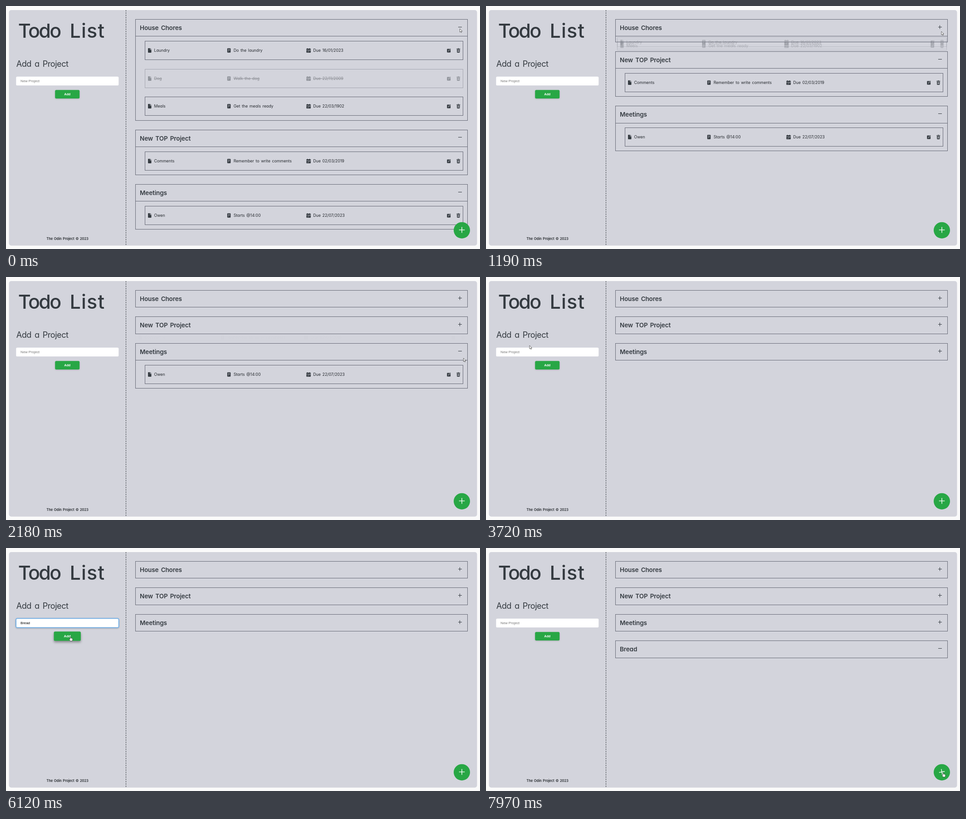
Recreate the animation shown at these times as an HTML page. Size 1045 by 536 pixels, loop 8 s.

```html
<!DOCTYPE html>
<html lang="en">
<head>
<meta charset="utf-8">
<title>Todo List</title>
<style>
  html, body { margin: 0; width: 100%; height: 100%; overflow: hidden; background: #fafafa; }
  svg { display: block; width: 1045px; height: 536px; }
  text { font-family: Inter, "Open Sans", sans-serif; font-feature-settings: "cv11"; fill: #343a40; white-space: pre; }
  .form text { font: 7.8px "Liberation Sans", Arial, sans-serif; fill: #000; }
  .form .hint { fill: #757575; }
  .form .label { font-size: 7.2px; font-weight: 700; fill: #fff; }
  .head { font-size: 13.5px; font-weight: 600; letter-spacing: -.12px; word-spacing: 2px; }
  .item text { font-size: 8.8px; word-spacing: 1.2px; fill: #25292e; }
  .line { fill: none; stroke: #676a77; stroke-width: 1; }
  .ink { fill: #343a40; }
  .cut { fill: none; stroke: #d3d4dc; stroke-width: .8; }
  .menu text { font: 5px "Noto Sans", "Open Sans", sans-serif; fill: #eee; }
  .cursor { fill: #fff; stroke: #333; stroke-width: .7; stroke-linejoin: round; }
</style>
</head>
<body>
<svg viewBox="0 0 1045 536" xmlns="http://www.w3.org/2000/svg">
  <defs>
    <g id="file" class="ink">
      <path d="M-2.7-5H.6V-2.3Q.6-1.6 1.3-1.6H3.7V3.9Q3.7 5 2.6 5H-2.6Q-3.7 5-3.7 3.9V-4Q-3.7-5-2.7-5Z"/>
      <path d="M1.3-5L3.7-2.4H1.3Z"/>
    </g>
    <g id="note">
      <rect class="ink" x="-3.7" y="-4.8" width="7.4" height="9.6" rx="1.2"/>
      <path class="cut" d="M-1.7-2.4H1.8M-1.7-.4H1.8M-1.7 1.6H.2"/>
    </g>
    <g id="date">
      <path class="ink" d="M-4.8-1.3V-3.1Q-4.8-4.1-3.8-4.1H-3.1V-5H-1.9V-4.1H1.9V-5H3.1V-4.1H3.8Q4.8-4.1 4.8-3.1V-1.3Z"/>
      <path class="ink" d="M-4.8-.6H4.8V3.9Q4.8 4.9 3.8 4.9H-3.8Q-4.8 4.9-4.8 3.9Z"/>
      <path class="cut" d="M-1 1H3.4M-3.4 3H1" stroke-dasharray="1.1 .6"/>
    </g>
    <g id="edit">
      <rect class="ink" x="-4.2" y="-3.6" width="7.8" height="8" rx="1.2"/>
      <path d="M-1.4 1.7L-.9-.3L3.2-4.3L4.4-3.1L.3 1.1Z" fill="#343a40" stroke="#d3d4dc" stroke-width=".7"/>
    </g>
    <g id="trash">
      <path class="ink" d="M-4-3.9H-1.5L-1.1-4.8H1.1L1.5-3.9H4V-2.7H-4ZM-3.4-2.1H3.4L3 4Q2.9 4.9 2 4.9H-2Q-2.9 4.9-3 4Z"/>
      <path class="cut" d="M-1.4-.8V3.4M0-.8V3.4M1.4-.8V3.4" stroke-width=".6"/>
    </g>
  </defs>

  <rect x="6.5" y="9" width="1032" height="519.5" rx="5" fill="#d3d4dc"/>
  <path d="M264.5 9V528" stroke="#343a40" stroke-dasharray="3 2.1"/>
  <text y="70" font-size="43" font-weight="500"><tspan x="26.8" letter-spacing="-2.6">Todo</tspan><tspan x="140.5" letter-spacing="1.2">List</tspan></text>
  <text x="22.7" y="134" font-size="18" letter-spacing="-.45" word-spacing="2.6">Add a Project</text>
  <text x="135.5" y="516.3" font-size="7.4" font-weight="600" word-spacing=".9" text-anchor="middle" style="fill:#23272b">The Odin Project © 2023</text>

  <g id="cards"></g>

  <g class="form">
    <g id="field">
      <rect id="glow" x="21.5" y="155" width="227.5" height="21" rx="3.5" fill="none" stroke="#7fb8ee" stroke-width="1.6"/>
      <rect id="box" x="22.3" y="155.7" width="226" height="19.6" rx="2.6" fill="#fff"/>
    </g>
    <text class="hint" id="hint" x="32" y="167.8">New Project</text>
    <text id="typed" x="32" y="167.8"></text>
    <rect id="caret" y="161" width=".8" height="9"/>
    <g id="button">
      <rect x="-27" y="-9.3" width="54" height="18.6" rx="2.6" fill="#28a745"/>
      <text class="label" y="2.4" text-anchor="middle">Add</text>
    </g>
  </g>
  <g id="menu" class="menu"></g>

  <g transform="translate(1005 494.7)">
    <circle r="18" fill="#28a745"/>
    <path id="cross" d="M-6.3-.8H6.3M0-7.1V5.5" stroke="#fff" stroke-width="1.4"/>
  </g>

  <path id="arrow" class="cursor" d="M0 0V7.6L1.8 6L3 8.6L4.2 8L3.1 5.5H5.4Z"/>
  <path id="hand" class="cursor" d="M-.8.7Q0-.6.8.7V3.4Q1.8 2.8 2.2 3.7Q3.2 3.2 3.6 4.1Q4.8 3.8 4.8 5.2V6.8Q4.7 8.4 3.8 9.6H-.2Q-1.2 8.4-2.6 6.2Q-3 5-1.8 5.1L-.8 6Z"/>
  <path id="beam" d="M-1.6-3.2H-.4L0-2.8L.4-3.2H1.6M0-2.8V2.8M-1.6 3.2H-.4L0 2.8L.4 3.2H1.6" fill="none" stroke="#444" stroke-width=".8"/>
</svg>

<script>
const LOOP = 8000, HEAD = 37.4, ROW = 61.75, GAP = 21.1, FOLD = 500;
const LEFT = 285.5, RIGHT = 1017.5;
const $ = id => document.getElementById(id);

// Each item: title, note, date, done
const projects = [
  { name: 'House Chores', close: 850, items: [
    ['Laundry', 'Do the laundry', '16/01/2023'],
    ['Dog', 'Walk the dog', '22/11/2009', true],
    ['Meals', 'Get the meals ready', '22/03/1902']] },
  { name: 'New TOP Project', close: 1715, items: [
    ['Comments', 'Remember to write comments', '02/03/2019']] },
  { name: 'Meetings', close: 2880, items: [
    ['Owen', 'Starts @14:00', '22/07/2023']] },
  { name: 'Bread', open: 6320, close: Infinity, items: [] }
];

const keys = [[4710, 'B'], [4850, 'r'], [5050, 'e'], [5390, 'a'], [5450, 'd']];
const FOCUS = 4010, SUBMIT = 6320;

// time, x, y, cursor shape from that time on
const path = [
  [0, 1000.5, 50, 'arrow'], [330, 1000.5, 50, 'arrow'], [480, 1000, 42, 'hand'], [950, 1000, 42, 'hand'],
  [1130, 1003, 52, 'arrow'], [1190, 1004, 56, 'arrow'], [1540, 1001, 102, 'hand'], [1860, 1001, 102, 'hand'],
  [1980, 1003, 112, 'arrow'], [2180, 1008.5, 179, 'arrow'], [2500, 1000, 161, 'hand'], [3000, 1000, 161, 'hand'],
  [3120, 975, 150, 'arrow'], [3360, 600, 103, 'arrow'], [3720, 96, 151, 'arrow'], [3850, 96, 151, 'arrow'],
  [3960, 94, 163.3, 'beam'], [5720, 94, 163.3, 'beam'], [5800, 104, 174, 'arrow'], [5920, 128, 188, 'hand'],
  [6060, 142, 195.5, 'hand'], [6500, 142, 195.5, 'hand'], [6580, 170, 203, 'arrow'], [7000, 640, 250, 'arrow'],
  [7370, 1008, 261, 'arrow'], [7520, 1010, 300, 'arrow'], [7820, 1009, 480, 'hand'], [7950, 1008, 495.5, 'hand']
];

function bezier(x1, y1, x2, y2) {
  const at = (a, b, u) => 3 * a * u * (1 - u) ** 2 + 3 * b * u * u * (1 - u) + u ** 3;
  return p => {
    let lo = 0, hi = 1;
    for (let i = 0; i < 20; i++) {
      const mid = (lo + hi) / 2;
      at(x1, x2, mid) < p ? lo = mid : hi = mid;
    }
    return at(y1, y2, lo);
  };
}
const ease = bezier(.25, .1, .25, 1), easeInOut = bezier(.42, 0, .58, 1);
const clamp = v => Math.max(0, Math.min(1, v));
const span = (t, from, length) => clamp((t - from) / length);
const mix = (a, b, p) => a + (b - a) * p;
const snap = v => Math.floor(v) + .5;

function add(parent, tag, attrs = {}, text = '') {
  const el = document.createElementNS('http://www.w3.org/2000/svg', tag);
  set(el, attrs);
  el.textContent = text;
  parent.append(el);
  return el;
}
function set(el, attrs) {
  for (const key in attrs) el.setAttribute(key, attrs[key]);
}
const show = (el, on) => { el.style.display = on ? '' : 'none'; };
const move = (el, x, y) => el.setAttribute('transform', `translate(${x} ${y})`);

function buildItem(parent, [title, note, date, done]) {
  const g = add(parent, 'g', { class: 'item' });
  const box = add(g, 'rect', { class: 'line' });
  const cols = [['file', title], ['note', note], ['date', 'Due ' + date]].map(([icon, label]) => {
    const col = add(g, 'g');
    add(col, 'use', { href: '#' + icon });
    const text = add(col, 'text', { x: icon === 'file' ? 9.7 : 10.2, y: 3.1 }, label);
    if (done) text.style.textDecoration = 'line-through';
    return col;
  });
  const tools = add(g, 'g');
  add(tools, 'use', { href: '#edit', x: -31.3 });
  add(tools, 'use', { href: '#trash', x: -10.5 });
  return { g, box, cols, tools, alpha: done ? .42 : 1 };
}

for (const p of projects) {
  p.g = add($('cards'), 'g');
  p.frame = add(p.g, 'rect', { class: 'line', x: LEFT, width: RIGHT - LEFT });
  p.rule = add(p.g, 'path', { class: 'line' });
  p.title = add(p.g, 'text', { class: 'head', x: 295 }, p.name);
  p.sign = add(p.g, 'path', { stroke: '#343a40', 'stroke-width': 1 });
  p.rows = p.items.map(item => buildItem(p.g, item));
}

add($('menu'), 'path', { d: 'M65 179.5H67.5L71 176.3L74.5 179.5H124.4Q126.4 179.5 126.4 181.5V268.5Q126.4 270.5 124.4 270.5H65Q63 270.5 63 268.5V181.5Q63 179.5 65 179.5Z', fill: '#2c2d32', 'fill-opacity': .9 });
['ewe', 'dasd', 'das', 'ese', 'wewe', 'dasdas'].forEach((word, i) =>
  add($('menu'), 'text', { x: 67.7, y: 190 + i * 14.7 }, word));

function drawItem(row, top, keep) {
  const left = snap(mix(285.5, 306.2, keep)), right = snap(mix(1018, 1007, keep));
  const y = snap(top + 10.5 * keep), height = Math.round(mix(14.5, 41, keep));
  const extra = right - left - 701, cy = y + height / 2;
  set(row.box, { x: left, y, width: right - left, height });
  move(row.cols[0], left + 10.3, cy);
  move(row.cols[1], left + 185 + extra * .23, cy);
  move(row.cols[2], left + 360.5 + extra * .5, cy);
  move(row.tools, right + .3, cy);
  row.g.setAttribute('opacity', row.alpha * keep);
}

function drawCards(t) {
  let y = 29.4;
  for (const p of projects) {
    const visible = t >= (p.open || 0);
    show(p.g, visible);
    if (!visible) continue;
    const k = span(t, p.close, FOLD);
    const pitch = ROW * (1 - ease(k)), keep = 1 - easeInOut(k);
    const body = pitch * p.rows.length, top = snap(y), rule = snap(y + HEAD);
    set(p.frame, { y: top, height: snap(y + HEAD + body) - top });
    p.rule.setAttribute('d', `M${LEFT} ${rule}H${RIGHT}`);
    p.title.setAttribute('y', y + 23.4);
    const cy = snap(y + 16.6);
    p.sign.setAttribute('d', `M997 ${cy}H1005` + (t >= p.close ? `M1000.5 ${cy - 4}V${cy + 4}` : ''));
    p.rows.forEach((row, i) => {
      show(row.g, k < 1);
      if (k < 1) drawItem(row, y + HEAD + i * pitch, keep);
    });
    y += HEAD + body + GAP;
  }
}

function drawForm(t) {
  const focused = t >= FOCUS && t < SUBMIT;
  const past = t < SUBMIT ? keys.filter(key => t >= key[0]) : [];
  const text = past.map(key => key[1]).join('');
  const last = past.length ? past[past.length - 1][0] : FOCUS;
  if ($('typed').textContent !== text) $('typed').textContent = text;
  show($('hint'), !text);
  show($('caret'), focused && (t - last) % 1000 < 500);
  $('caret').setAttribute('x', 32.3 + (text ? $('typed').getComputedTextLength() : 0));
  const lit = focused ? span(t, FOCUS, 150) : 0;
  $('glow').setAttribute('opacity', lit * .8);
  set($('box'), { stroke: '#3f93dd', 'stroke-width': .8, 'stroke-opacity': lit });
  $('field').style.filter = lit ? `drop-shadow(0 1px 1.5px rgba(0,0,0,${.22 * lit}))` : 'none';

  const hover = ease(span(t, 5920, 180)) - ease(span(t, 6550, 180));
  $('button').setAttribute('transform', `translate(135.2 194.6) scale(${1 + .1 * hover})`);
  $('button').style.filter = `drop-shadow(0 ${1.5 + 1.5 * hover}px ${1.5 + hover}px rgba(0,0,0,${.2 + .15 * hover}))`;

  show($('menu'), t >= 4710 && t < 4990);
  $('menu').setAttribute('opacity', 1 - span(t, 4850, 140));
}

function drawCursor(t) {
  let i = path.length - 1;
  while (path[i][0] > t) i--;
  const a = path[i], b = path[i + 1] || a;
  const p = b === a ? 0 : span(t, a[0], b[0] - a[0]);
  for (const kind of ['arrow', 'hand', 'beam']) show($(kind), kind === a[3]);
  move($(a[3]), mix(a[1], b[1], p), mix(a[2], b[2], p));
}

function draw(t) {
  drawCards(t);
  drawForm(t);
  $('cross').setAttribute('transform', `rotate(${-90 * easeInOut(span(t, 7850, 500))} 0 -.8)`);
  drawCursor(t);
}

const start = performance.now();
function tick() {
  draw((performance.now() - start) % LOOP);
  requestAnimationFrame(tick);
}
tick();
</script>
</body>
</html>
```
